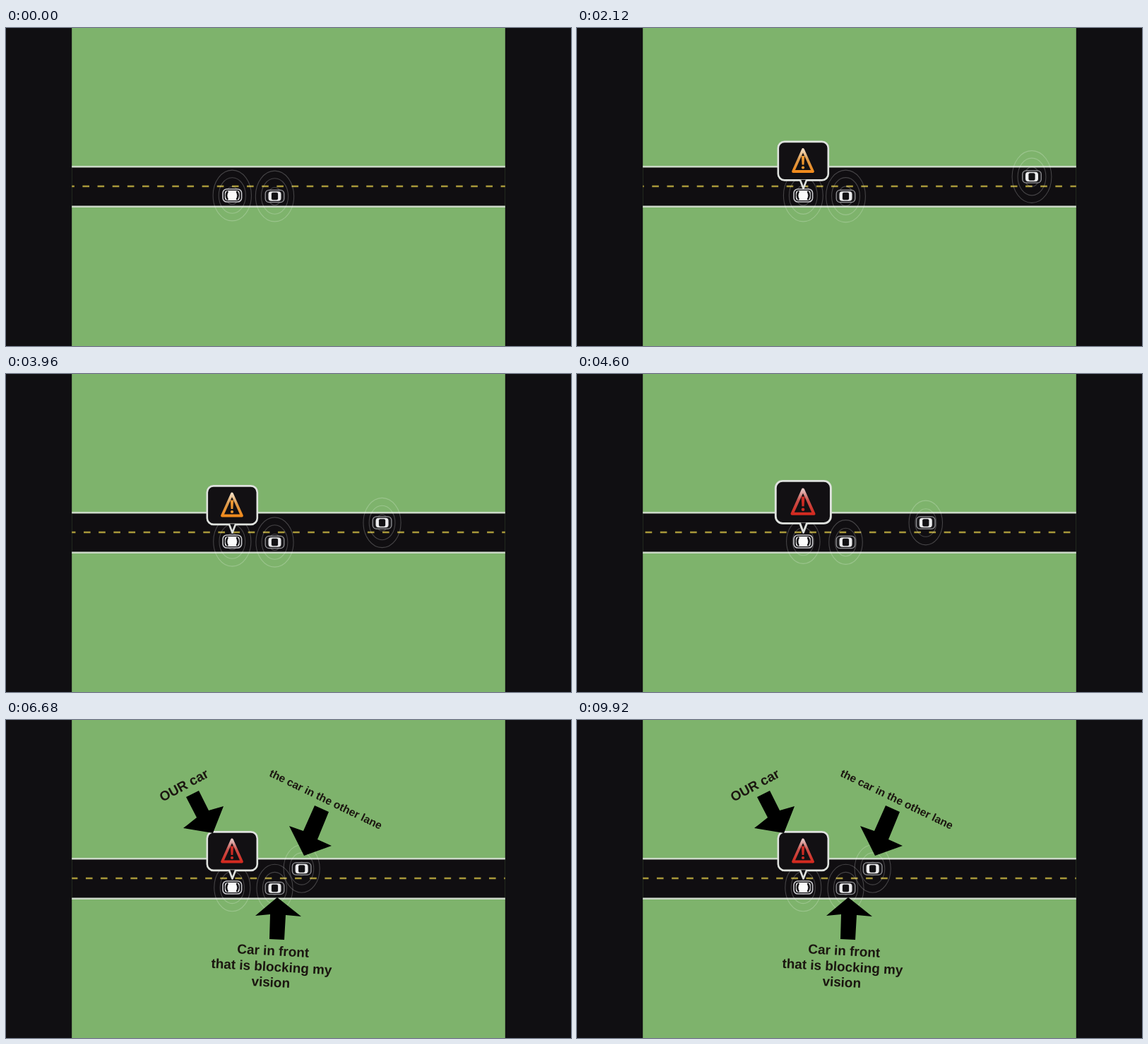
An HTML page for the animation above (10000 ms loop, 800 by 450 pixels).

```html
<!DOCTYPE html>
<html lang="en">
<head>
<meta charset="utf-8">
<title>Overtaking warning</title>
<style>
  html, body { margin: 0; width: 100%; height: 100%; overflow: hidden; background: #100f12; }
  svg { display: block; width: 100vw; height: 100vh; }
  .ring { fill: none; stroke: #fff; stroke-width: 1.1; }
  .edge { stroke: #ccd9c8; stroke-width: 2.4; }
  .dash { stroke: #a8983a; stroke-width: 2.6; stroke-dasharray: 9.6 11.55; }
  #notes { font: bold 18.9px "Liberation Sans", Arial, sans-serif; fill: #1b1610; text-anchor: middle; }
  #notes polygon { fill: #000; }
</style>
</head>
<body>
<svg viewBox="0 0 800 450">
  <defs>
    <clipPath id="view"><rect x="93.2" width="613.6" height="450"/></clipPath>
    <linearGradient id="amber" x1="0" y1="0" x2="0" y2="1">
      <stop offset="0" stop-color="#f3dcc0"/><stop offset=".45" stop-color="#dc9a4c"/><stop offset="1" stop-color="#f08a1c"/>
    </linearGradient>
    <linearGradient id="red" x1="0" y1="0" x2="0" y2="1">
      <stop offset="0" stop-color="#e4c4c2"/><stop offset=".45" stop-color="#c9504a"/><stop offset="1" stop-color="#d42a20"/>
    </linearGradient>
    <g id="own">
      <rect x="-13.3" y="-9" width="26.6" height="18" rx="5.5" fill="#131215" stroke="#c6c6ca" stroke-width="1.6"/>
      <rect x="-10.5" y="-7" width="21" height="14" rx="4" fill="#e8e8ea"/>
      <path d="M-6.2-6Q-10.5 0-6.2 6M6.2-6Q10.5 0 6.2 6" fill="none" stroke="#131215" stroke-width="2.6"/>
      <rect x="-5.6" y="-6.8" width="11.2" height="13.6" rx="2.5" fill="#fafafa"/>
    </g>
    <g id="other">
      <rect x="-13.3" y="-8.6" width="26.6" height="17.2" rx="5" fill="#19181b" stroke="#939397" stroke-width="1.3"/>
      <rect x="-9" y="-6.8" width="18" height="13.6" rx="4" fill="#ececee"/>
      <rect x="-4.6" y="-5.3" width="9.2" height="10.6" rx="2" fill="#121114"/>
    </g>
  </defs>

  <rect width="800" height="450" fill="#100f12"/>
  <g clip-path="url(#view)">
    <rect x="93" width="614" height="450" fill="#7eb36c"/>
    <rect x="93" y="196" width="614" height="57" fill="#100e11"/>
    <path class="edge" d="M93 196.3H707M93 252.7H707"/>
    <path class="dash" id="dash" d="M65.7 224H760"/>

    <g class="car" transform="translate(320.3 237)"><use href="#own"/></g>
    <g class="car" transform="translate(380.5 238)"><use href="#other"/></g>
    <g class="car" id="oncoming"><use href="#other"/></g>

    <g id="bubble">
      <rect x="-35.2" y="-69.6" width="71" height="54.5" rx="9" fill="#121013" stroke="#dfe2de" stroke-width="2.6"/>
      <path d="M-4.2-15.8L.5-3.5L5.2-15.8" fill="#121013" stroke="#dfe2de" stroke-width="2.6" stroke-linejoin="round"/>
      <g id="sign" stroke-linejoin="round">
        <path d="M0-58.5L14-27.5H-14Z" fill="none" stroke-width="3.8"/>
        <path d="M-2.2-49.5H2.2L1.4-37H-1.4Z" stroke="none"/>
        <circle cy="-33" r="2.1" stroke="none"/>
      </g>
    </g>

    <g id="notes">
      <polygon points="255,109 273,100 287,128 308,122 293,160 251,153 270,138"/>
      <polygon points="437,121 457,130 441,169 461,178 422,192 401,150 421,157"/>
      <polygon points="384,251 418,278 396,276 394,311 373,310 374,275 353,277"/>
      <text transform="translate(255 98) rotate(-28.5)">OUR car</text>
      <text font-size="15.5" transform="translate(450.5 117) rotate(25.8)">the car in the other lane</text>
      <g transform="translate(376 349) rotate(3.2)">
        <text x="1" y="-16">Car in front</text>
        <text y="6.5">that is blocking my</text>
        <text y="28.5">vision</text>
      </g>
    </g>
  </g>
</svg>
<script>
const LOOP = 10000, STEP = 40, STOP = 5840, RED_AT = 4600;
const PULSE = 1010, RINGS = 3;
const $ = id => document.getElementById(id);
const dash = $('dash'), oncoming = $('oncoming'), bubble = $('bubble'), sign = $('sign'), notes = $('notes');

const scaleKeys = [[1160, 0], [1360, .55], [1560, 1.08], [1720, 1], [4560, 1], [4680, 1.3], [4840, 1]];
const dropKeys = [[1360, 0], [2000, 2.5], [3160, 2.5], [3400, -3], [3600, 0]];
const fadeKeys = [[STOP, 0], [6680, 1]];

// Linear interpolation through [time, value] pairs, clamped at both ends
function at(keys, t) {
  let [t0, v0] = keys[0];
  for (const [t1, v1] of keys) {
    if (t < t1) return t <= t0 ? v0 : v0 + (v1 - v0) * (t - t0) / (t1 - t0);
    [t0, v0] = [t1, v1];
  }
  return v0;
}

const rings = [];
for (const car of document.querySelectorAll('.car')) {
  for (let i = 0; i < RINGS; i++) {
    const el = document.createElementNS('http://www.w3.org/2000/svg', 'ellipse');
    el.setAttribute('class', 'ring');
    car.prepend(el);
    rings.push({ el, i });
  }
}

function drawRings(t) {
  const u = (t / PULSE + .6) % 1;
  for (const { el, i } of rings) {
    const age = u + i;
    const r = 3 + 11.25 * age - .75 * age * age;
    el.setAttribute('rx', r);
    el.setAttribute('ry', r * 1.32);
    el.setAttribute('opacity', .22 * Math.min(1, (RINGS - age) * 6));
  }
}

function draw(time) {
  const t = Math.floor(time % LOOP / STEP) * STEP;
  const move = Math.min(t, STOP);
  dash.setAttribute('stroke-dashoffset', move * .02095 - .4);
  oncoming.setAttribute('transform', `translate(${772.4 - move * .06057} 210.5)`);
  drawRings(move);

  const s = at(scaleKeys, t);
  bubble.setAttribute('transform', `translate(320 ${228 + at(dropKeys, t)}) scale(${s})`);
  bubble.style.display = s ? '' : 'none';
  const paint = t < RED_AT ? 'amber' : 'red';
  sign.setAttribute('stroke', `url(#${paint})`);
  sign.setAttribute('fill', paint === 'red' ? '#cc2a22' : '#ee962e');

  notes.style.opacity = at(fadeKeys, t);
}

let start;
function frame(now) {
  start ??= now;
  draw(now - start);
  requestAnimationFrame(frame);
}
draw(0);
requestAnimationFrame(frame);
</script>
</body>
</html>
```
